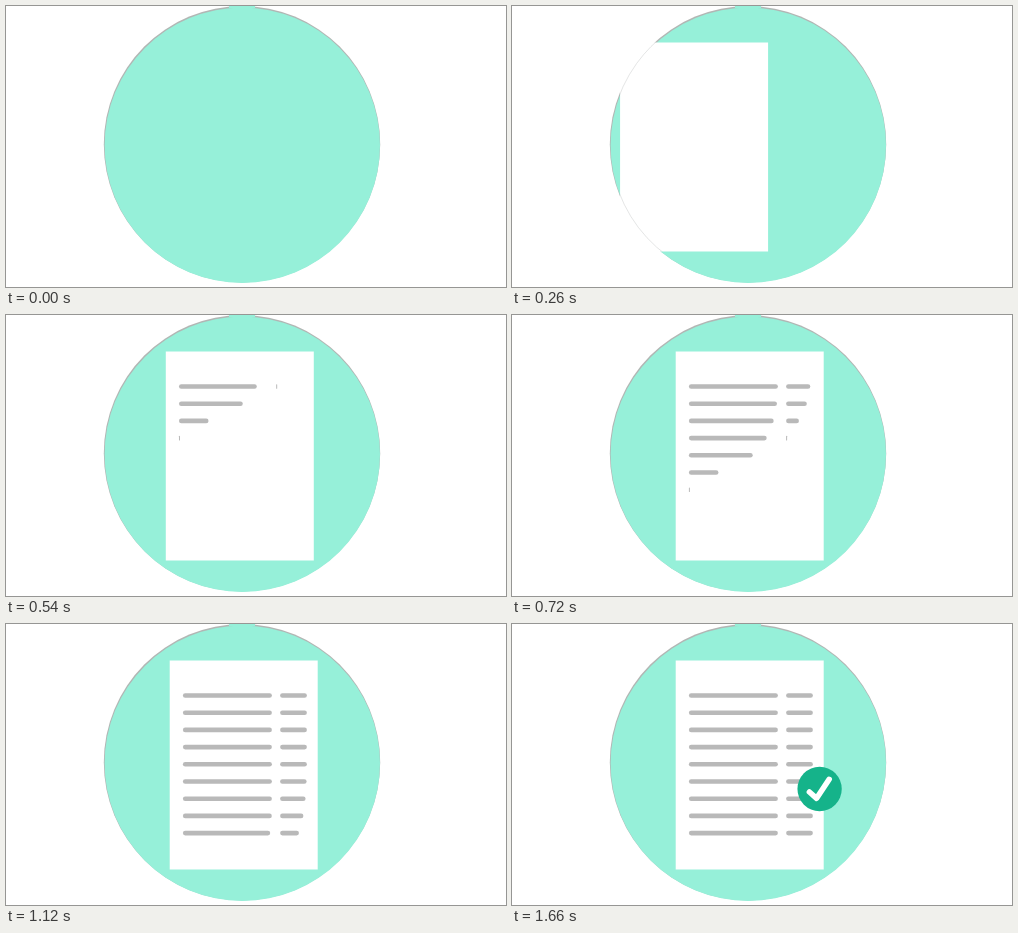
Write an HTML page with a canvas that moves like this. It is 500 px wide and 281 px high and loops after 2400 ms.

```html
<!DOCTYPE html>
<html lang="en">
<head>
<meta charset="utf-8">
<title>Document check</title>
<style>
  html, body { margin: 0; height: 100%; overflow: hidden; background: #fff; }
  canvas { display: block; }
</style>
</head>
<body>
<canvas id="stage" width="500" height="281"></canvas>
<script>
const ctx = document.getElementById('stage').getContext('2d');
const LOOP = 2400, STEP = 20;
const MINT = '#96f0d9', GREY = '#b9b9b9', EDGE = '#b2b6b4', GREEN = '#15b38a';
const PAGE = { x: 163.7, y: 36.5, w: 148, h: 209, slide: 250 };
const ROWS = 9, ROW_GAP = 17.2, STAGGER = 60;
const COLUMNS = [
  { x: 13.2, width: 89, start: 360, duration: 360 },
  { x: 110.4, width: 26.8, start: 525, duration: 355 }
];

// cubic-bezier(.25, 0, 0, 1), solved by bisection
function ease(time, start, duration) {
  const x = (time - start) / duration;
  if (x <= 0) return 0;
  if (x >= 1) return 1;
  let lo = 0, hi = 1;
  for (let i = 0; i < 24; i++) {
    const s = (lo + hi) / 2;
    if (0.75 * s * (1 - s) ** 2 + s ** 3 < x) lo = s; else hi = s;
  }
  return lo * lo * (3 - 2 * lo);
}

function disc(x, y, r, color) {
  ctx.fillStyle = color;
  ctx.beginPath();
  ctx.arc(x, y, r, 0, Math.PI * 2);
  ctx.fill();
}

function drawBackdrop() {
  disc(236, 138.3, 138.2, EDGE);
  disc(236.3, 139.3, 137.7, MINT);
  ctx.fillRect(223, 0, 26, 2);
}

function drawPage(t) {
  const left = PAGE.x - PAGE.slide * (1 - ease(t, 0, 677));
  ctx.save();
  ctx.beginPath();
  ctx.rect(left, PAGE.y, PAGE.w, PAGE.h);
  ctx.fillStyle = '#fff';
  ctx.fill();
  // faint rim where the page crosses the disc's edge
  ctx.clip();
  ctx.globalAlpha = 0.35;
  ctx.strokeStyle = EDGE;
  ctx.beginPath();
  ctx.arc(236, 138.3, 137.6, Math.PI * 0.7, Math.PI * 1.4);
  ctx.stroke();
  ctx.restore();

  ctx.fillStyle = GREY;
  for (const col of COLUMNS) {
    for (let row = 0; row < ROWS; row++) {
      const start = col.start + row * STAGGER;
      if (t < start) continue;
      const w = Math.max(1, col.width * ease(t, start, col.duration));
      ctx.beginPath();
      ctx.roundRect(left + col.x, 69.2 + row * ROW_GAP, w, 4.6, Math.min(2.3, w / 2));
      ctx.fill();
    }
  }
}

function drawBadge(t) {
  const scale = ease(t, 1220, 480);
  if (!scale) return;
  ctx.save();
  ctx.translate(307.6, 165);
  ctx.scale(scale, scale);
  disc(0, 0, 22.2, GREEN);
  ctx.strokeStyle = '#fff';
  ctx.lineWidth = 5.6;
  ctx.lineCap = ctx.lineJoin = 'round';
  ctx.beginPath();
  ctx.moveTo(-10.2, 3);
  ctx.lineTo(-3, 9.3);
  ctx.lineTo(9.6, -9.7);
  ctx.stroke();
  ctx.restore();
}

function draw(now) {
  const t = Math.floor((now % LOOP) / STEP) * STEP;
  ctx.fillStyle = '#fff';
  ctx.fillRect(0, 0, 500, 281);
  drawBackdrop();
  if (t >= 100) drawPage(t);
  drawBadge(t);
}

const origin = performance.now();
function tick() {
  draw(performance.now() - origin);
  requestAnimationFrame(tick);
}
tick();
</script>
</body>
</html>
```
